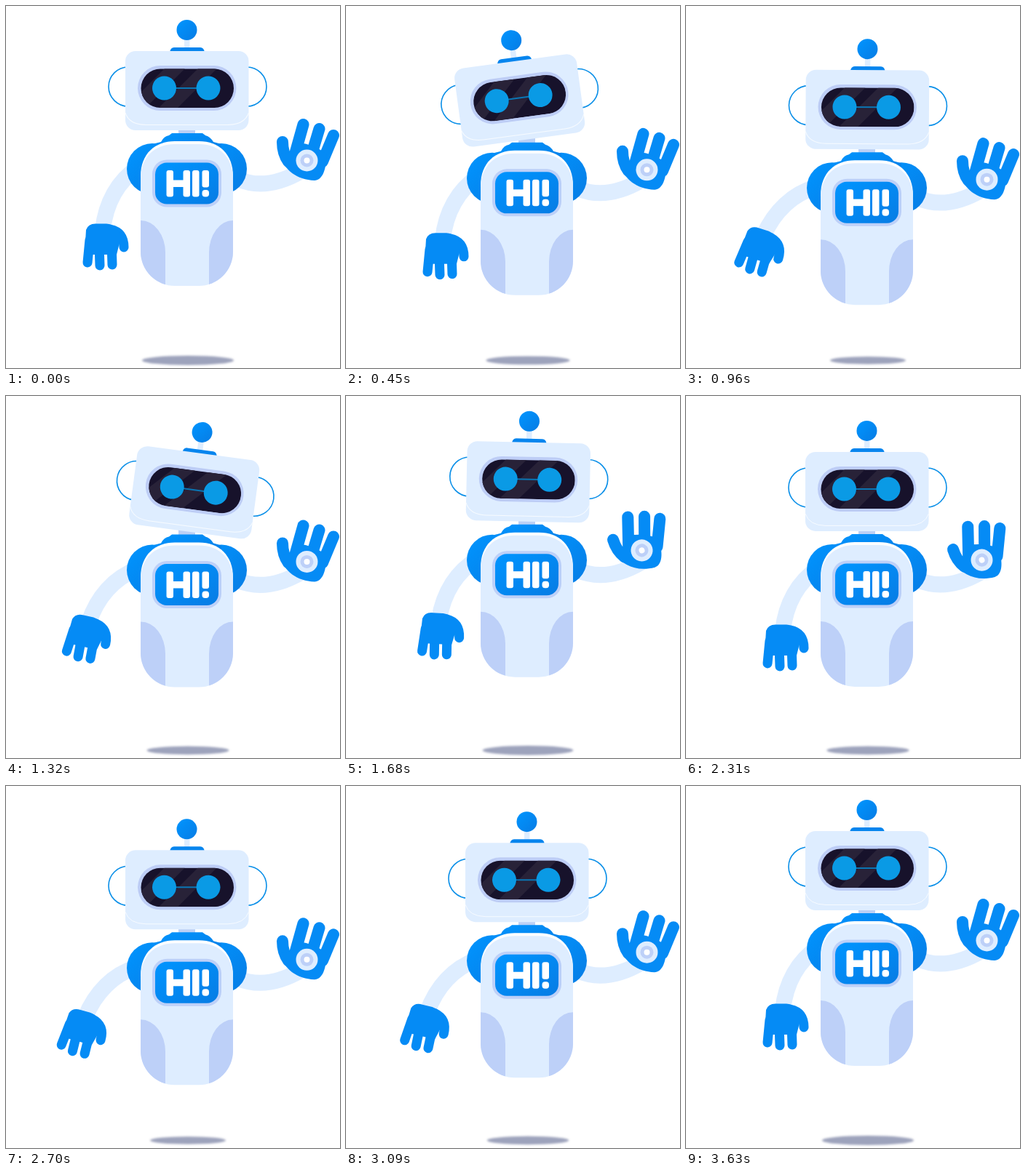
An HTML page for the animation above (3660 ms loop, 459 by 498 pixels).

```html
<!DOCTYPE html>
<html lang="en">
<head>
<meta charset="utf-8">
<title>Waving robot</title>
<style>
  html, body { margin: 0; width: 100%; height: 100%; overflow: hidden; background: #fff; }
  svg { display: block; }
  .light { fill: #deedff; }
  .lilac { fill: #bdd0f8; }
  .blue { fill: url(#blue); }
  .arm { fill: none; stroke: #deedff; stroke-width: 22; }
  .fingers { fill: none; stroke: #058bf5; stroke-linecap: round; }
</style>
</head>
<body>
<svg width="459" height="498" viewBox="0 0 459 498">
  <defs>
    <linearGradient id="blue" x2="1" y2="1">
      <stop stop-color="#0095ff"/><stop offset="1" stop-color="#077ce4"/>
    </linearGradient>
    <filter id="soft" x="-10%" y="-50%" width="120%" height="200%"><feGaussianBlur stdDeviation="1.5"/></filter>
    <path id="torso" d="M185 238C185 207 205 190 232 190H265C293 190 312 208 312 238V338A47 47 0 0 1 265 385H232A47 47 0 0 1 185 338Z"/>
    <clipPath id="inTorso"><use href="#torso"/></clipPath>
    <clipPath id="inVisor"><rect x="185.500" y="86.500" width="127.500" height="53.500" rx="26.700"/></clipPath>
  </defs>

  <ellipse id="shadow" cx="250" cy="487.500" fill="#9da3bc" filter="url(#soft)"/>

  <g id="robot">
    <g id="leftArm">
      <path class="arm" d="M133 308C137 271 154 240 182 222"/>
      <path class="fingers" stroke-width="13" d="M115 322L112 353M128 328L129 357M145 326L146 356M143 307Q162 311 162 332"/>
      <path fill="#058bf5" d="M110 308Q113 299 124 299.500H138Q153 301 158 318L152 342H108Z"/>
    </g>

    <path class="arm" d="M318 238Q358 255 406 227"/>
    <g id="rightHand">
      <path class="fingers" stroke-width="16" d="M408.500 163L397 204M430.500 169L420 204M450 178L435 214M380 187Q380 203 388 214"/>
      <path fill="#058bf5" d="M394 200L403 188Q422 190 440 203C441 226 434 240 424 240C400 239 382 226 376 204Z"/>
      <circle class="light" cx="413.500" cy="212.500" r="15"/>
      <circle class="lilac" cx="413.500" cy="212.500" r="9"/>
      <circle fill="#fff" cx="413.500" cy="212.500" r="4"/>
    </g>

    <path fill="#bcd0f5" d="M237 168H260V182H237Z"/>
    <circle class="blue" cx="201" cy="224" r="35"/>
    <circle class="blue" cx="296" cy="224" r="35"/>
    <path class="blue" d="M201 190L213 187Q217 179 224 178L228 175H270L274 178Q281 180 285 187L296 190V210H201Z"/>

    <use href="#torso" fill="#fff" y="-4"/>
    <use href="#torso" class="light"/>
    <path class="lilac" clip-path="url(#inTorso)" d="M185 295A34 44 0 0 1 219 339V385H185ZM312 295A33 44 0 0 0 279 339V385H312Z"/>

    <rect class="lilac" x="201" y="211.500" width="95" height="65" rx="20"/>
    <rect class="blue" x="205" y="215.500" width="87" height="57" rx="16"/>
    <g fill="#fff" role="img" aria-label="HI!">
      <rect x="220.500" y="226" width="9.500" height="36.500" rx="3"/>
      <rect x="243.500" y="226" width="9.500" height="36.500" rx="3"/>
      <rect x="225" y="239.500" width="23" height="9.500"/>
      <rect x="256" y="226" width="9.500" height="36.500" rx="3"/>
      <rect x="269.500" y="226" width="9.500" height="23.500" rx="3"/>
      <rect x="269.500" y="253" width="9.500" height="9.500" rx="4"/>
    </g>

    <g id="head">
      <path class="light" d="M245 44H252.500V60H245Z"/>
      <circle class="blue" cx="248.500" cy="33" r="14"/>
      <path fill="#0785ee" d="M225 64Q226 57 231 57H267Q272 57 273 64Z"/>
      <g fill="none" stroke="#0a8fe8" stroke-width="1.600">
        <circle cx="168" cy="111" r="27"/><circle cx="331" cy="111" r="27"/>
      </g>
      <rect class="light" x="164" y="62" width="169.500" height="109" rx="14"/>
      <path fill="none" stroke="#f7fbff" d="M164 147Q169 163 192 163.500H305Q328 163 333.500 147"/>
      <rect fill="#bdcdf6" x="181" y="82" width="135.500" height="62" rx="31"/>
      <g clip-path="url(#inVisor)">
        <path fill="#17122b" d="M185 86H313V140H185Z"/>
        <path fill="#282238" d="M218 86H246L192 140H164ZM264 86H290L236 140H210Z"/>
      </g>
      <path stroke="#0a75b4" stroke-width="2" d="M217 113H278"/>
      <g fill="#0a9ae5"><circle cx="217.500" cy="113" r="16.500"/><circle cx="278" cy="113" r="16.500"/></g>
    </g>
  </g>
</svg>
<script>
const LOOP = 3660;
const el = id => document.getElementById(id);
const sine = p => (1 - Math.cos(Math.PI * p)) / 2;
const drop = p => p ** 1.5;

// Each key is [time, value, easing towards this key].
function track(keys, t) {
  for (let i = 1; i < keys.length; i++) {
    const [t0, v0] = keys[i - 1], [t1, v1, ease = sine] = keys[i];
    if (t <= t1) return v0 + (v1 - v0) * ease((t - t0) / (t1 - t0));
  }
  return keys.at(-1)[1];
}

const bob = [[0, 0], [915, 26.3], [1830, 0], [2715, 26.3], [3600, 0]];
const tilt = [[0, 0], [450, -7.7], [900, 0], [1350, 7.7], [1800, 0]];
const swing = [[0, 0], [450, 0], [960, 17.6], [1780, 0, drop], [2310, 0], [2800, 17.6], [3600, 0, drop]];
const wave = [[0, 0], [1380, 0], [1690, -17], [1995, 0], [2305, -17], [2610, 0]];

const turn = (id, angle, x, y) => el(id).setAttribute("transform", `rotate(${angle} ${x} ${y})`);

function draw(now) {
  const t = now % LOOP, y = track(bob, t);
  el("robot").setAttribute("transform", `translate(0 ${y})`);
  turn("head", track(tilt, t), 248, 192);
  turn("leftArm", track(swing, t), 177, 213);
  turn("rightHand", track(wave, t), 404, 235);
  el("shadow").setAttribute("rx", 63 - y * 0.42);
  el("shadow").setAttribute("ry", 6.5 - y * 0.05);
}

const start = performance.now();
function tick() {
  draw(performance.now() - start);
  requestAnimationFrame(tick);
}
tick();
</script>
</body>
</html>
```
